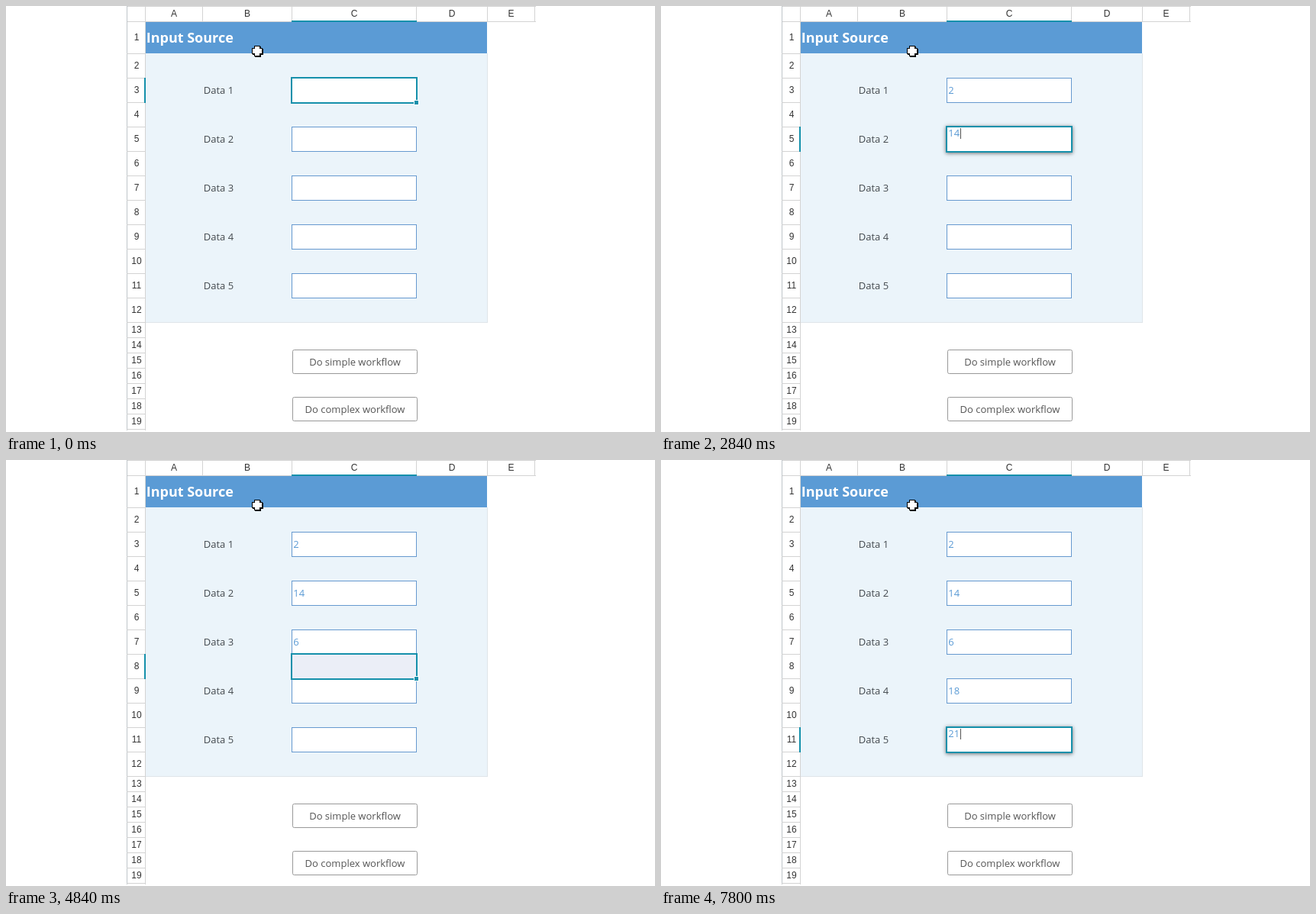
An HTML page with a canvas that plays this animation: 850x558 px, repeating every 8000 ms.

```html
<!DOCTYPE html>
<html lang="en">
<head>
<meta charset="utf-8">
<title>Input sheet</title>
<style>
  html, body { margin: 0; width: 100%; height: 100%; overflow: hidden; background: #fff; }
  canvas { display: block; }
</style>
</head>
<body>
<canvas id="stage" width="850" height="558"></canvas>
<script>
const ctx = document.getElementById('stage').getContext('2d');
const LOOP = 8000;
const TEAL = '#1590ab', BLUE = '#5b9bd5', GRID = '#d3d3d3';
const SHEET_FONT = '13px "Open Sans", "Noto Sans", sans-serif';
const HEAD_FONT = '12px "Liberation Sans", Arial, sans-serif';
const COLS = [182, 257, 374, 537, 630, 692];

// [start, selected row, text being typed]
const STEPS = [
  [0, 3], [1080, 3, '2'],
  [1640, 4], [1880, 5], [2360, 5, '1'], [2840, 5, '14'],
  [3240, 6], [3560, 7], [4040, 7, '6'],
  [4600, 8], [4920, 9], [5480, 9, '1'], [5960, 9, '18'],
  [6600, 10], [6840, 11], [7400, 11, '2'], [7800, 11, '21']
];

const rowTop = r => r < 2 ? 20 : r < 13 ? 62 + (r - 2) * 32 : 414 + (r - 13) * 20;

function box(color, x, y, w, h) {
  ctx.fillStyle = color;
  ctx.fillRect(x, y, w, h);
}

function text(str, x, y, color, font = SHEET_FONT, align = 'left') {
  ctx.font = font;
  ctx.textAlign = align;
  ctx.fillStyle = color;
  ctx.fillText(str, x, y);
}

function frame(color, x, y, w, h, width = 1) {
  ctx.strokeStyle = color;
  ctx.lineWidth = width;
  ctx.strokeRect(x, y, w, h);
}

function headers(row) {
  box(GRID, 158, 0, 536, 1);
  box(GRID, 158, 20, 536, 1);
  box('#bfc5c9', 158, 0, 1, 556);
  box(GRID, 182, 0, 1, 556);
  COLS.forEach((x, i) => {
    box(GRID, x, 0, 1, 20);
    if (i < 5) text('ABCDE'[i], (x + COLS[i + 1]) / 2 + .5, 14, '#333', HEAD_FONT, 'center');
  });
  for (let r = 1; r < 20; r++) {
    const top = rowTop(r), bottom = rowTop(r + 1);
    box(GRID, 158, bottom, 24, 1);
    text(r, 171, Math.round((top + bottom) / 2) + 4, '#333', HEAD_FONT, 'center');
  }
  box(TEAL, 374, 19, 164, 2);
  box(TEAL, 181, rowTop(row), 2, 33);
}

function button(label, y) {
  ctx.beginPath();
  ctx.roundRect(375.5, y + .5, 163, 31, 2);
  ctx.strokeStyle = '#999';
  ctx.lineWidth = 1;
  ctx.stroke();
  text(label, 457, y + 21, '#555', SHEET_FONT, 'center');
}

function panel(values) {
  box('#ebf4fa', 183, 62, 447, 352);
  box(BLUE, 183, 21, 447, 41);
  box('#dfe5e9', 630, 62, 1, 353);
  box('#dfe5e9', 183, 414, 448, 1);
  text('Input Source', 183.7, 48, '#fff', 'bold 18px "Open Sans", "Noto Sans", sans-serif');
  for (let i = 1; i < 6; i++) {
    const row = 2 * i + 1, y = rowTop(row);
    text('Data ' + i, 258.8, y + 21, '#454b50');
    box('#fff', 374, y, 164, 33);
    frame('#6699cf', 374.5, y + .5, 163, 32);
    text(values[row] || '', 376.3, y + 21, BLUE);
  }
}

function selection(row, typed) {
  const y = rowTop(row);
  if (typed) {
    ctx.save();
    ctx.shadowColor = 'rgba(0,0,0,.55)';
    ctx.shadowBlur = 5;
    ctx.shadowOffsetY = 1;
    box('#fff', 373, y - 1, 166, 35);
    ctx.restore();
    text(typed, 376.3, y + 13, BLUE);
    box('#555', 376 + 8 * typed.length, y + 2, 1, 14);
  } else if (row % 2 === 0) {
    box('#ebeef7', 374, y, 164, 33);
  }
  frame(TEAL, 374, y, 164, 33, 2);
  if (!typed) {
    box('#fff', 534, y + 29, 7, 7);
    box(TEAL, 535, y + 30, 5, 5);
  }
}

function plus(color, x, y, size, arm) {
  const gap = (size - arm) / 2;
  box(color, x + gap, y, arm, size);
  box(color, x, y + gap, size, arm);
}

function cursor() {
  plus('#000', 323, 53, 14, 8);
  plus('#000', 322, 52, 14, 8);
  plus('#fff', 323, 53, 12, 6);
}

function draw(now) {
  const t = now % LOOP;
  const done = STEPS.filter(s => s[0] <= t);
  const [, row, typed] = done[done.length - 1];
  const values = {};
  for (const [, r, str] of done) if (r < row && str) values[r] = str;

  box('#fff', 0, 0, 850, 558);
  panel(values);
  headers(row);
  selection(row, typed);
  button('Do simple workflow', 450);
  button('Do complex workflow', 512);
  cursor();
}

const start = performance.now();
function tick() {
  draw(performance.now() - start);
  requestAnimationFrame(tick);
}
tick();
</script>
</body>
</html>
```
